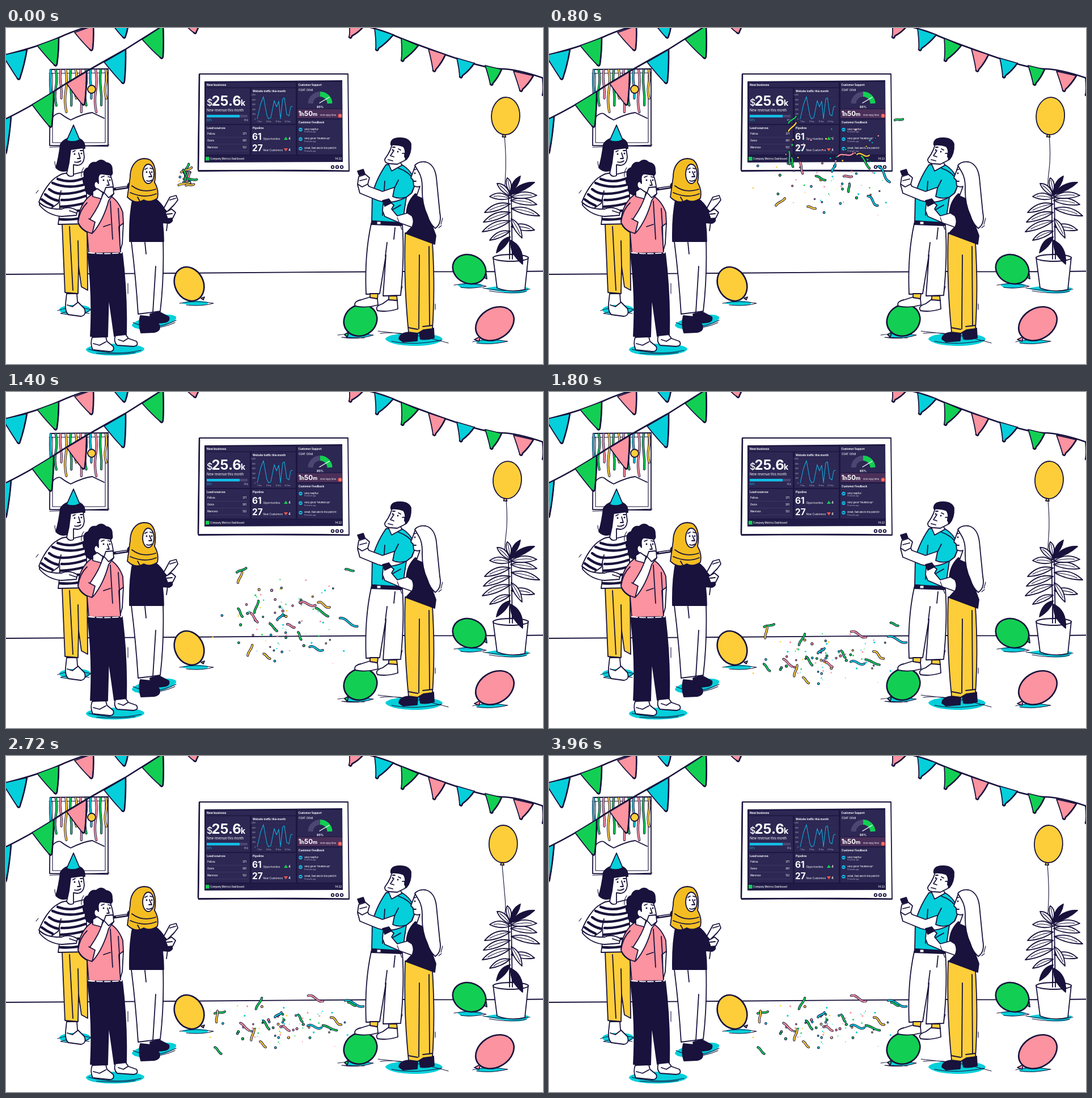
Recreate the animation shown at these times as an HTML page with a canvas. Size 947x592 px, loop 4000 ms.

```html
<!DOCTYPE html>
<html lang="en">
<head>
<meta charset="utf-8">
<title>Office celebration</title>
<style>
html,body{margin:0;width:100%;height:100%;overflow:hidden;background:#fff}
svg,canvas{position:absolute;left:0;top:0;width:947px;height:592px}
path,ellipse,circle{fill:none;stroke:#18123c;stroke-width:1.8;stroke-linecap:round;stroke-linejoin:round}
.w{fill:#fff}.n{fill:#18123c}.g{fill:#12cf53}.t{fill:#05cfda}.p{fill:#fb93a0}.y{fill:#fdce3a}.gold{fill:#f3bd22}
.x{stroke:none}.thin{stroke-width:1.1}.bold{stroke-width:2.6}.stripe{stroke-width:4.4}
.lt{stroke:#fff}
text{font-family:Inter,Roboto,sans-serif;fill:#fff}
.b{font-weight:700}.m{font-weight:500}.dim{fill:#c4c2d6}.cy{fill:#12bfe8}.end{text-anchor:end}.mid{text-anchor:middle}
</style>
</head>
<body>
<svg viewBox="0 0 947 592">
  <path d="M0 434Q150 433 300 432T640 429.5M698 429Q800 430 947 428.5"/>

  <g id="window">
    <path class="w" d="M78 73L180 72L180 208L77 207Z"/>
    <path class="thin" d="M82 79V202H175V78M76 80L181 79M77 210L182 206"/>
    <path d="M82 157Q92 147 98 152T114 162Q136 151 152 149L173 159"/>
    <g id="ribbons"></g>
    <circle class="y" cx="151" cy="108" r="7"/>
  </g>

  <g id="bunting">
    <path d="M0 47Q60 32 93 17T152 -4M0 160Q50 135 84 112T210 38L280 -6M612 -8Q660 2 682 12T775 47T873 72T947 88" class="bold"/>
  </g>

  <g id="tv">
    <path class="w" d="M341 81L603 81L605 252L339 251Z"/>
    <path class="bold" d="M340 252Q470 250 604 252M341 82L339 249"/>
    <path class="x" style="fill:#1d1741" d="M350 94L593 92L594 236L350 237Z"/>
    <g id="dash"></g>
    <circle class="w" cx="576" cy="245" r="2.3"/><circle class="w" cx="584" cy="245" r="2.3"/><circle class="w" cx="592" cy="245" r="2.3"/>
  </g>

  <g id="floorBalloons">
    <path class="t x" d="M308 485Q330 477 356 483Q360 489 330 489Z"/>
    <path class="thin" d="M306 485Q335 479 366 485Q345 491 318 488"/>
    <path class="y" d="M348 479L344 476L350 474Z"/>
    <ellipse class="y bold" cx="323" cy="451" rx="25" ry="31" transform="rotate(-27 323 451)"/>
    <path class="t x" d="M796 453Q818 444 842 453Q834 460 803 458Z"/>
    <path class="thin" d="M790 453Q815 447 847 455Q820 460 802 457"/>
    <path class="g" d="M838 437L847 433L848 442Z"/>
    <ellipse class="g bold" cx="817" cy="425" rx="30" ry="25" transform="rotate(24 817 425)"/>
    <path class="t x" d="M600 541Q622 532 645 541Q634 547 604 545Z"/>
    <path class="thin" d="M585 541Q615 536 648 541Q620 550 592 545L632 546"/>
    <path class="g" d="M604 536L597 540L602 545Z"/>
    <ellipse class="g bold" cx="625" cy="515" rx="30" ry="27" transform="rotate(-30 625 515)"/>
    <path class="t x" d="M828 552Q850 545 882 552Q865 558 832 556Z"/>
    <path class="thin" d="M823 553Q850 546 885 552Q855 559 830 555"/>
    <path class="p" d="M837 543L826 549L834 552Z"/>
    <ellipse class="p bold" cx="862" cy="521" rx="36" ry="27" transform="rotate(-32 862 521)"/>
  </g>

  <g id="airBalloon">
    <path id="string" class="thin"/>
    <g id="bulb">
      <path class="y" d="M-3 33L-4 37L2 37L0 32Z"/>
      <ellipse class="y" rx="25" ry="33"/>
    </g>
  </g>

  <g id="plant">
    <path class="t x" d="M843 459Q880 450 922 458Q920 470 885 467Z"/>
    <path class="thin" d="M841 458Q880 466 924 460M852 463Q890 470 918 464"/>
    <path class="w" d="M889 412L886 292L891 290L893 412Z"/>
    <path class="w" d="M859 404L866 458Q890 467 915 461L921 404Z"/>
    <ellipse class="w" cx="890" cy="405" rx="31" ry="6"/>
    <path d="M888 407L888 380M893 407L893 380"/>
    <g id="leaves"></g>
  </g>

  <g id="stripedWoman">
    <path class="t x" d="M94 497C92 486 146 484 149 495C150 508 97 509 94 497"/>
    <path class="thin" d="M91 498Q115 488 150 496Q130 510 96 503Q110 497 147 503"/>
    <path class="y" d="M99 345L104 466L127 468L128 420L133 456L144 462L143 345Z"/>
    <path d="M112 350L118 462M128 422L127 375"/>
    <path class="w" d="M107 468L125 468L126 482L138 494Q143 506 132 508L110 505Q104 500 105 486ZM108 488L117 491L126 484"/>
    <path class="w" d="M90 262Q104 252 118 258L142 252L142 345L92 346Q96 320 94 300Z"/>
    <path class="w" d="M90 262C78 268 64 290 58 307L76 320L92 309L97 287"/>
    <path class="stripe" d="M91 266Q116 275 141 263M82 273Q110 285 141 275M76 284Q86 292 97 292Q118 293 140 285M69 293Q80 302 91 304M98 303Q118 304 140 296M63 302Q72 309 82 313M96 315Q118 314 140 308M126 322H140M95 337Q118 339 140 333"/>
    <path class="w" d="M59 308Q72 320 98 319Q112 313 126 322L124 330L98 332Q74 330 59 312ZM112 322L124 326"/>
    <path class="n" d="M96 205Q104 192 122 193Q140 196 139 212L113 216L111 250Q98 256 88 246Q93 230 96 205Z"/>
    <path class="w" d="M114 214L136 211L138 227Q137 241 126 242L119 241L119 260Q111 264 107 256L111 238Z"/>
    <path d="M128 220L131 230L126 230M121 236Q127 238 132 234M118 218L122 216M131 216L135 216"/>
    <circle class="n x" cx="121" cy="222" r="1.5"/><circle class="n x" cx="133" cy="221" r="1.5"/>
    <path class="t" d="M119 171L107 198Q118 203 130 197Z"/>
    <path class="thin" d="M86 235Q86 242 89 246M53 291L57 286"/>
  </g>

  <g id="hornBoy">
    <path class="t x" d="M141 567C142 553 243 553 244 566C238 580 146 581 141 567"/>
    <path class="thin" d="M146 566Q190 578 238 568M160 573Q200 576 228 572"/>
    <path class="n" d="M144 397L205 396Q214 470 212 541L191 543L181 472L179 544L149 543Q153 470 144 397Z"/>
    <path class="w" d="M152 545L176 544L178 552L189 561Q192 570 182 570L153 567Q148 556 152 545ZM154 556L165 559L176 553"/>
    <path class="w" d="M193 542L211 540L216 547L230 552Q235 560 224 561L196 559Q189 552 193 542ZM198 549L207 552L215 547"/>
    <path class="w" d="M200 340L207 344L205 380L201 394Z"/>
    <path class="p" d="M150 294L178 292Q198 302 206 325L207 344L199 350L202 396L146 397L143 360Q128 352 127 340Q129 310 150 294Z"/>
    <path d="M198 318L200 350M184 305L188 372M172 350L184 346"/>
    <path d="M146 396Q175 399 204 396" class="lt" stroke-dasharray="10 4"/>
    <path class="w" d="M150 334Q165 312 169 297L178 280L187 283L190 292L181 304Q172 338 154 360L140 350Z"/>
    <path class="p" d="M143 308Q130 320 127 342Q134 358 152 362L157 342L146 336"/>
    <path class="n" d="M148 294Q138 290 140 279Q133 270 138 262Q135 249 145 246Q149 235 159 237Q168 229 176 237Q188 239 187 251Q189 258 184 260L164 264L162 292Z"/>
    <path class="w" d="M163 270Q161 256 170 257L184 259Q188 270 189 279L186 289Q176 292 168 288L161 284Q154 281 156 273Q160 267 163 274Z"/>
    <path class="w" d="M153 288L161 283L171 290L168 301L153 297Z"/>
    <path d="M179 268L182 277L178 277M168 263L173 261M180 262L184 263"/>
    <circle class="n x" cx="172" cy="268" r="1.5"/><circle class="n x" cx="183" cy="268" r="1.5"/>
    <path style="stroke-width:5" d="M190 284L217 280"/><path class="lt thin" d="M194 283L213 280"/>
    <circle class="n" cx="218" cy="277" r="3.5"/>
    <path class="w" d="M176 281L189 280L190 292L181 299L173 290Z"/>
    <path class="thin" d="M215 450V468M133 262Q132 253 137 246"/>
  </g>

  <g id="scarfWoman">
    <path class="t x" d="M222 524C224 512 290 498 300 509C304 524 230 540 222 524"/>
    <path class="thin" d="M224 519Q260 535 300 515M235 528Q270 532 298 519"/>
    <path class="n" d="M254 504L270 500L287 509Q290 518 276 519L256 521Z"/>
    <path class="n" d="M237 507L257 509L270 523Q274 533 262 536L238 537Q233 522 237 507Z"/>
    <path class="w" d="M221 376L277 374Q279 440 272 499L233 504Q229 440 221 376Z"/>
    <path d="M264 420L259 501M245 378L247 398"/>
    <path class="w" d="M278 318L289 298L300 295L303 303L297 311L284 324Z"/>
    <path class="n" d="M224 298L262 300Q274 308 281 322L292 334Q296 341 288 344L276 343Q278 360 278 376L218 376Q217 330 224 298Z"/>
    <path class="w" d="M281 325L292 319L299 325L294 335L285 336ZM289 303L299 300M284 328L293 327"/>
    <path d="M285 342L283 357"/>
    <path class="gold" d="M243 230C227 231 219 246 219 262L214 298Q228 312 243 303Q254 309 267 300Q270 285 262 272Q267 244 255 233Q250 230 243 230Z"/>
    <path d="M222 278Q240 292 264 284M219 290Q244 301 265 292M232 298L236 305"/>
    <ellipse class="w" cx="251" cy="257" rx="10" ry="17"/>
    <path d="M253 253L257 262L252 262M248 269Q253 271 257 268M245 249L249 247M254 247L258 248"/>
    <circle class="n x" cx="248" cy="254" r="1.4"/><circle class="n x" cx="257" cy="254" r="1.4"/>
  </g>

  <g id="man">
    <path class="w" d="M644 345L699 347Q703 400 696 471L665 472L670 400L659 468L635 469Q632 400 644 345Z"/>
    <path d="M669 402L672 378M686 352L684 372"/>
    <path class="w" d="M642 474L655 477L656 488Q636 494 616 490Q612 482 626 479Z"/>
    <path class="w" d="M675 478L690 480L691 495Q672 501 655 498Q650 490 664 486Z"/>
    <path class="y" d="M642 468H656L655 477L642 475ZM675 472H689L690 480L675 479Z"/>
    <path class="t" d="M670 241L692 238Q716 248 722 274L716 290L706 298L699 345L645 340L646 292Q654 264 670 241Z"/>
    <path d="M668 270L664 330M682 320L696 312"/>
    <path class="n" d="M645 340L697 343L697 348L644 346Z"/><path class="w thin" d="M654 341H661V346H654Z"/>
    <path class="w" d="M706 298Q680 312 656 304L624 291L620 276L634 268L640 279L664 288L684 281L702 284Z"/>
    <path class="t" d="M692 247Q714 254 722 274L715 291L706 298Q692 302 682 297L685 282L692 268"/>
    <path class="w" d="M622 262L634 258L641 264L638 275L628 280L620 275ZM624 269L636 266"/>
    <path class="n" d="M620 252L630 249L633 257L623 260Z"/>
    <path class="w" d="M674 238L694 232L698 242L680 252Z"/>
    <path class="w" d="M681 205L678 214L674 222L668 231Q667 238 676 239L690 240L704 233L708 214L700 205Z"/>
    <path class="n" d="M679 206Q677 196 690 194Q709 192 714 204Q715 222 706 232L703 226Q706 216 701 209Q692 205 679 206Z"/>
    <path d="M684 216L678 225L684 227M674 232L682 234M682 210L686 210M692 213L696 215M699 221Q705 219 703 227"/>
    <circle class="n x" cx="682" cy="215" r="1.4"/><circle class="n x" cx="691" cy="218" r="1.4"/>
  </g>

  <g id="hairWoman">
    <path class="t x" d="M669 548C672 534 765 534 770 548C764 564 678 564 669 548"/>
    <path class="thin" d="M660 538Q700 533 780 555M680 552Q720 560 768 550M656 534L700 539"/>
    <path class="n" d="M693 548Q694 537 712 536L726 538L725 551L700 553Z"/>
    <path class="n" d="M728 531L754 529L755 546Q742 550 731 548Z"/>
    <path class="y" d="M704 361L752 378Q757 460 752 530L736 532L726 538L710 536Q701 450 704 361Z"/>
    <path d="M729 400L728 530M746 385L747 525M710 528L726 531M735 526L752 524"/>
    <path class="n" d="M722 292Q707 306 706 328L716 350L705 362L756 381L758 366L750 344L738 300Z"/>
    <path class="w" d="M708 326L690 331L680 319L684 312L675 305L665 310L664 322L668 332L696 344L716 351Q721 340 716 331Z"/>
    <path class="n" d="M664 304L675 301L680 308L668 314Z"/>
    <path class="w" d="M722 242L717 256L714 264L718 268L719 278Q725 281 730 279L724 296L738 302L739 250Z"/>
    <path class="w" d="M721 242Q728 234 740 236Q756 240 759 264L765 325Q769 345 757 353Q748 346 743 330Q733 310 734 280Q734 264 728 254Z"/>
    <path d="M718 270L723 270M719 250L723 249"/>
    <circle class="n x" cx="721" cy="256" r="1.4"/>
    <path class="thin" d="M767 346L770 335M763 352L768 348M757 486V496M690 334L698 355M699 455L696 466"/>
  </g>
</svg>
<canvas id="confetti"></canvas>
<script>
const INK = '#18123c', LOOP = 4000;
const HUE = {g: '#12cf53', y: '#fdce3a', p: '#fb93a0', t: '#05cfda'};
const $ = id => document.getElementById(id);
const path = (d, cls = '', style = '') => `<path d="${d}" class="${cls}" style="${style}"/>`;
const text = (x, y, size, str, cls = '') => `<text x="${x}" y="${y}" font-size="${size}" class="${cls}">${str}</text>`;
const box = (x, y, w, h, fill) => `<rect x="${x}" y="${y}" width="${w}" height="${h}" fill="${fill}"/>`;

// Ribbons over the window
$('ribbons').innerHTML = [...'tgpygypgtpgy'].map((c, i) => {
  const x = 79 + i * 8.8, h = 62 + 14 * Math.sin(i * 2.1 + 1);
  const d = `M${x} 74q${i % 2 ? 3 : -2} ${h / 4} 0 ${h / 2}t1 ${h / 2}`;
  return path(d, '', 'stroke-width:4.2') + path(d, '', `stroke-width:2.4;stroke:${HUE[c]}`);
}).join('');

// Pennants: string points, tip, colour
function flag(x1, y1, x2, y2, tx, ty, c) {
  const mx = (x1 + tx) / 2, my = (y1 + ty) / 2;
  const right = `Q${tx} ${ty + 2} ${tx + 1} ${ty - 4}Q${(x2 + tx) / 2 + 2} ${(y2 + ty) / 2} ${x2} ${y2}`;
  return path(`M${x1} ${y1}Q${mx} ${my + 3} ${tx - 4} ${ty - 2}${right}Z`, c) +
    path(`M${tx - 4} ${ty - 2}${right}`, 'bold');
}
$('bunting').innerHTML += [
  [-6, 48, 37, 38, 24, 91, 't'], [55, 31, 93, 17, 89, 67, 'g'], [121, 8, 154, -4, 152, 40, 'p'], [186, -8, 216, -12, 210, 18, 't'],
  [-22, 170, 9, 156, 0, 222, 't'], [46, 135, 84, 112, 80, 175, 'g'], [107, 98, 142, 77, 138, 136, 'p'],
  [173, 60, 211, 38, 208, 98, 't'], [240, 20, 277, -4, 276, 54, 'g'], [312, -10, 342, -14, 335, 10, 'p'],
  [605, -8, 630, -2, 609, 18, 'p'], [650, 1, 683, 12, 656, 40, 't'], [697, 18, 727, 31, 701, 59, 'g'], [745, 37, 775, 47, 757, 77, 'p'],
  [795, 53, 826, 62, 804, 88, 't'], [845, 66, 874, 73, 858, 101, 'g'], [895, 76, 930, 84, 910, 112, 'p'], [946, 88, 980, 92, 950, 120, 't']
].map(f => flag(...f)).join('');

// Dashboard
const PANEL = '#2c2753', GREY = '#4b4672';
const leads = [['Pellora', 371], ['Ostrin', 301], ['Marnivox', 132]];
const notes = ['Very helpful!', 'Very good "thumbs up"', 'Great, fast and to the point it!'];
let dash = box(352, 96, 159, 8.5, PANEL) + box(352, 106, 78, 63, PANEL) + box(352, 171, 78, 52, PANEL) +
  box(433, 106, 78, 63, PANEL) + box(433, 171, 78, 52, PANEL) + box(514, 95, 79, 47, PANEL) +
  box(514, 143, 79, 16, '#4a3059') + box(514, 161, 79, 62, PANEL) + box(352, 225, 241, 11, '#211c47');
dash += text(354, 102, 5, 'New business', 'b') + text(354, 137, 16, '$', 'm') + text(362.5, 137, 24, '25.6', 'b') +
  text(414, 137, 14, 'k', 'b') + text(354, 147, 5.7, 'New revenue this month') +
  box(354, 153, 72, 4.5, GREY) + box(354, 153, 58, 4.5, '#12bfe8') +
  text(354, 164, 4.3, '80%', 'cy') + text(427, 164, 4.3, '45k', 'dim end') + text(354, 178, 5, 'Lead sources', 'b');
leads.forEach(([name, n], i) => {
  const y = 188 + i * 12;
  dash += text(355, y, 4.2, name, 'm') + text(424, y, 4.2, n, 'm end') + box(354, y + 4, 72, .5, GREY);
});
dash += text(435, 113, 4.6, 'Website traffic this month', 'b');
for (let i = 0; i < 6; i++)
  dash += text(440, 119 + i * 8.5, 3.1, i ? 1000 - i * 200 : '1,000', 'dim end') + box(442, 118 + i * 8.5, 64, .3, '#3d3865');
['1 Sep', '8 Sep', '15 Sep', '22 Sep'].forEach((s, i) => dash += text(447 + i * 16.5, 166, 3.1, s, 'dim mid'));
dash += path('M443 160L449 134L454 121L460 154L463 160L467 158L473 128L477 139L481 129L484 160L488 125L491 123L495 152L499 155L502 139L505 138', '', 'stroke:#12a9d8;stroke-width:1.1') +
  text(435, 178, 5, 'Pipeline', 'b') + text(434, 197, 15.5, '61', 'b') + text(453.5, 197, 4.7, 'Opportunities') +
  text(434, 217, 15.5, '27', 'b') + text(453.5, 217, 4.6, 'New Customers') +
  path('M490 197L493.5 191.5L497 197Z', 'g x') + text(498, 197, 6, '4', 'm') +
  path('M490 212L493.5 217.5L497 212Z', 'x', 'fill:#f2574f') + text(498, 217, 6, '4', 'm');
dash += text(515.5, 102, 4.6, 'Customer Support', 'b') + text(516, 111, 4.6, 'CSAT (30d)', 'm') +
  path('M537 133A17 17 0 0 1 554 116.5', '', `stroke:${GREY};stroke-width:9;stroke-linecap:butt`) +
  path('M554 116.5A17 17 0 0 1 571 133', '', `stroke:${HUE.g};stroke-width:9;stroke-linecap:butt`) +
  path('M553 132L570 122', 'lt', 'stroke-width:1.4') + text(554, 141, 5.2, '85%', 'b mid') +
  text(515.5, 155, 11.5, '1<tspan font-size="9">h</tspan>50<tspan font-size="9">m</tspan>', 'b') +
  text(554, 155, 4, 'First reply time') + '<circle cx="589" cy="154.5" r="3.5" style="stroke:none;fill:#f2574f"/>' +
  text(589, 156.5, 5, '!', 'b mid') + text(516, 168, 4.6, 'Customer Feedback', 'b');
notes.forEach((s, i) => {
  const y = 179 + i * 16.8;
  dash += `<circle cx="519.5" cy="${y}" r="3.2" style="stroke:none;fill:#12bfe8"/>` + path(`M518 ${y}h3`, 'thin') +
    text(526, y + .5, 4.1, s, 'm') + text(526, y + 5, 2.9, '10 minutes ago', 'dim');
});
dash += box(352, 227, 6.5, 6.5, HUE.g) + text(360, 232, 4.3, 'Company Metrics Dashboard', 'm') + text(592, 231.5, 4.5, '14:22', 'm end');
$('dash').innerHTML = dash;

// Plant leaves: base, tip, half width, dark flag; the middle arches upwards
function leaf(x1, y1, x2, y2, w, dark) {
  const l = Math.hypot(x2 - x1, y2 - y1), nx = -(y2 - y1) / l * w * 1.4, ny = (x2 - x1) / l * w * 1.4;
  const mx = (x1 + x2) / 2, my = (y1 + y2) / 2 - 4;
  return path(`M${x1} ${y1}Q${mx + nx} ${my + ny} ${x2} ${y2}Q${mx - nx} ${my - ny} ${x1} ${y1}Z`, dark ? 'n' : 'w') +
    path(`M${x1} ${y1}Q${mx} ${my} ${mix(x1, x2, .8)} ${mix(y1, y2, .8) - 1}`, 'thin');
}
const mix = (a, b, k) => a + (b - a) * k;
$('leaves').innerHTML = [
  [889, 358, 853, 374, 7], [891, 350, 932, 356, 8], [889, 340, 840, 359, 8], [891, 336, 910, 370, 7],
  [889, 325, 842, 342, 8], [891, 318, 941, 331, 8], [889, 310, 844, 325, 8], [890, 304, 936, 311, 8],
  [889, 300, 853, 297, 8], [890, 298, 936, 295, 8], [889, 296, 866, 274, 7], [889, 294, 932, 272, 7, 1],
  [889, 292, 907, 261, 6, 1], [889, 290, 884, 264, 6], [889, 368, 865, 396, 7, 1], [890, 374, 911, 416, 10, 1]
].map(l => leaf(...l)).join('');

// Swaying balloon
const clamp = k => Math.max(0, Math.min(1, k));
const swing = k => (1 - Math.cos(Math.PI * clamp(k))) / 2;
function drawBalloon(t) {
  const k = t < 1000 ? swing((t + 1200) / 2200) : t < 2800 ? 1 - swing((t - 1200) / 1600) : swing((t - 2800) / 2200);
  const x = mix(876.8, 884.3, k);
  $('bulb').setAttribute('transform', `translate(${x} 155) rotate(${mix(1, 4, k)})`);
  $('string').setAttribute('d', `M${x - 2} 190Q${x + 1} 225 ${mix(880, 882, k)} 250T${mix(878, 880, k)} 283`);
}

// Confetti: side, colour, length, angle, mid-air point, resting point
const streamers = [
  [0, 'g', 18, -10, 440, 225, 377, 452], [0, 'y', 20, 95, 440, 238, 372, 459], [0, 'g', 22, -62, 435, 292, 446, 436],
  [0, 'p', 20, 40, 456, 310, 421, 477], [0, 'g', 18, 55, 490, 328, 459, 474], [0, 'y', 20, -75, 419, 370, 435, 491],
  [0, 'y', 14, 45, 474, 380, 453, 508], [0, 'g', 16, 45, 440, 300, 374, 519], [1, 'p', 28, 20, 509, 287, 546, 427],
  [1, 't', 24, 8, 557, 368, 544, 477], [1, 'y', 22, 35, 540, 287, 582, 467], [1, 'g', 26, 20, 544, 300, 571, 479],
  [1, 'p', 14, 35, 513, 325, 494, 480], [1, 'g', 14, 60, 515, 345, 519, 462], [1, 't', 14, -35, 488, 310, 480, 456],
  [1, 't', 34, 18, 577, 321, 614, 436], [1, 'g', 14, 25, 603, 225, 610, 437]
];
let seed = 11;
const rnd = () => (seed = seed * 16807 % 2147483647) / 2147483647;
const dots = Array.from({length: 84}, (_, i) => {
  const xe = 490 + (rnd() + rnd() - 1) * 145, ye = 438 + (rnd() + rnd()) * 36 + (i % 16 ? 0 : 35);
  const side = xe > 470 ? 1 : 0;
  return {side, c: 'gptyptg'[i % 7], r: .7 + rnd(), ring: i % 5 < 2,
    at: [side, 490 + (xe - 490) * .85 + (rnd() - .5) * 40, ye - 220 + rnd() * 110, xe, ye]};
});
const POP = [{x: 300, y: 293, t: -40}, {x: 622, y: 262, t: 200}], MID = 1080, FALL = .24;

// Shot out of a popper, drifting through the mid-air point, then down to rest
function place(t, side, xm, ym, xe, ye) {
  if (t >= MID) {
    const s = clamp((t - MID) * FALL / (ye - ym)), k = 1 - (1 - s) ** 1.2;
    return {x: mix(xm, xe, k), y: mix(ym, ye, k), left: 1 - k};
  }
  const p = POP[side], d = MID - t;
  const k = 1 - (1 - clamp((t - p.t) / 460)) ** 2.2;
  const fx = xm + d / 560 * (side ? 28 : -22), fy = ym - .25 * d + .00008 * d * d;
  return {x: mix(p.x, fx, k), y: mix(p.y, fy, k), left: 1 + d / 900};
}

const cv = $('confetti'), ctx = cv.getContext('2d'), dpr = window.devicePixelRatio || 1;
cv.width = 947 * dpr;
cv.height = 592 * dpr;

function drawConfetti(t) {
  ctx.setTransform(dpr, 0, 0, dpr, 0, 0);
  ctx.clearRect(0, 0, 947, 592);
  ctx.lineCap = 'round';
  for (const d of dots) {
    if (t < POP[d.side].t) continue;
    const q = place(t, ...d.at);
    ctx.beginPath();
    ctx.arc(q.x, q.y, d.r, 0, 7);
    if (d.ring) {
      ctx.strokeStyle = INK;
      ctx.lineWidth = 2;
      ctx.stroke();
    }
    ctx.fillStyle = HUE[d.c];
    ctx.fill();
  }
  streamers.forEach(([side, c, len, deg, ...pts], i) => {
    if (t < POP[side].t) return;
    const q = place(t, side, ...pts), wave = len > 20 && c !== 'g' ? 7 : 2.5;
    ctx.save();
    ctx.translate(q.x, q.y);
    ctx.rotate((deg + q.left * (i % 2 ? 28 : -24)) * Math.PI / 180);
    ctx.beginPath();
    ctx.moveTo(-len / 2, 0);
    ctx.bezierCurveTo(-len / 6, -wave, len / 6, wave, len / 2, 0);
    for (const [color, width] of [[INK, 4.2], [HUE[c], 2.3]]) {
      ctx.strokeStyle = color;
      ctx.lineWidth = width;
      ctx.stroke();
    }
    ctx.restore();
  });
}

function frame() {
  const t = performance.now() % LOOP;
  drawBalloon(t);
  drawConfetti(t);
  requestAnimationFrame(frame);
}
frame();
</script>
</body>
</html>
```
